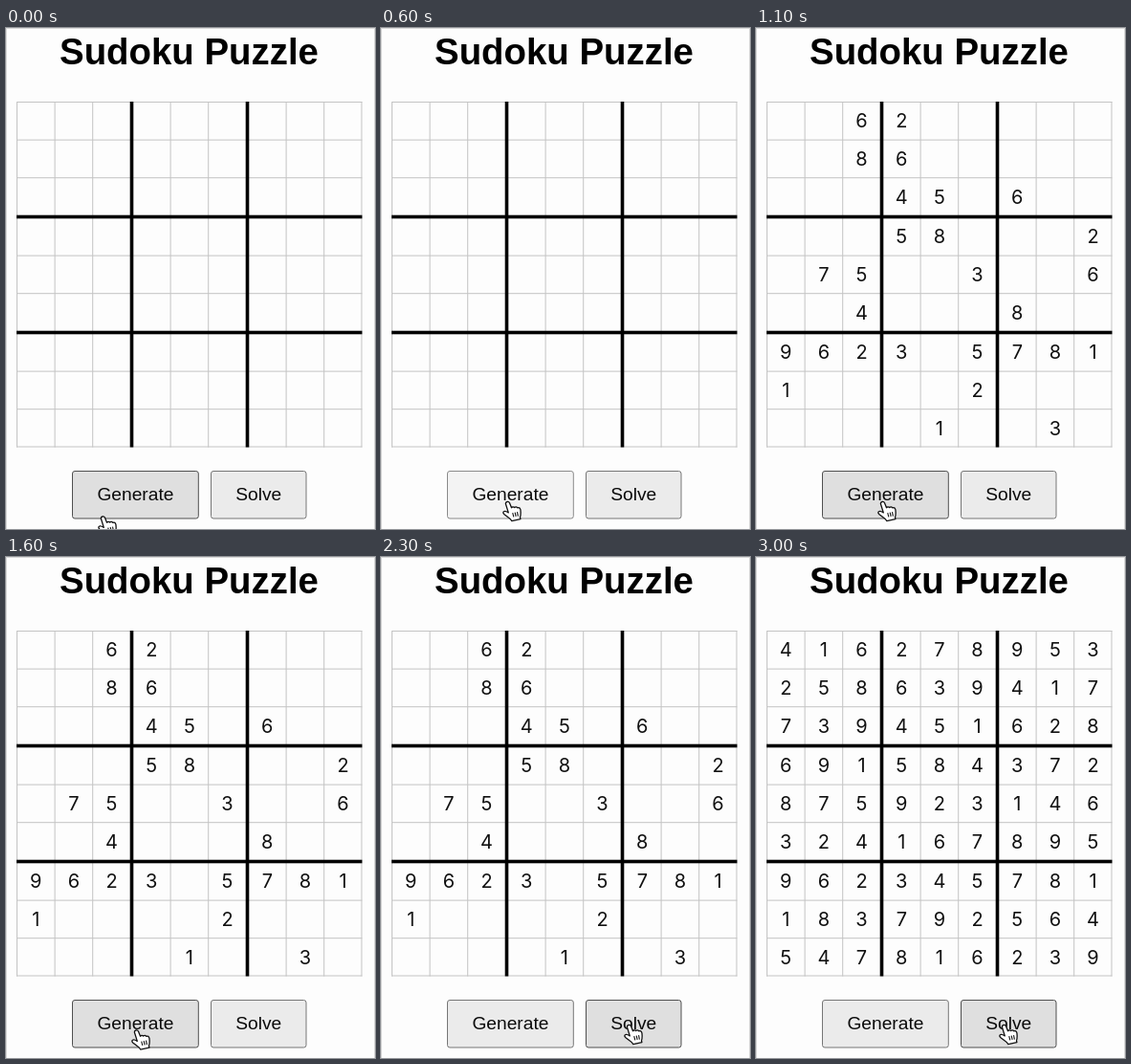
An HTML page with a canvas for the animation above (4000 ms loop, 386 by 524 pixels).

```html
<!DOCTYPE html>
<html lang="en">
<head>
<meta charset="utf-8">
<title>Sudoku Puzzle</title>
<style>
html, body { margin: 0; width: 100%; height: 100%; overflow: hidden; background: #fdfdfd; }
canvas { display: block; width: 386px; height: 524px; }
</style>
</head>
<body>
<canvas id="stage" width="386" height="524"></canvas>
<script>
const ctx = document.getElementById('stage').getContext('2d');
const LOOP = 4000;
const STEP = 100;
const SANS = '"Liberation Sans", Arial, sans-serif';

const solution = [
  '416278953', '258639417', '739451628',
  '691584372', '875923146', '324167895',
  '962345781', '183792564', '547816239'
];
// '#' marks the cells given at the start
const givens = [
  '..##.....', '..##.....', '...##.#..',
  '...##...#', '.##..#..#', '..#...#..',
  '####.####', '#....#...', '....#..#.'
];

const buttons = [
  { label: 'Generate', x: 69, w: 132.8, down: [600, 800] },
  { label: 'Solve', x: 214, w: 100.5, down: [2800, 2900] }
];
const BTN_Y = 463, BTN_H = 50.5;
const looks = {
  idle: ['#ebebeb', '#767676'],
  hover: ['#dfdfdf', '#4f4f4f'],
  down: ['#f3f3f3', '#8a8a8a']
};

// pointer stops: time, x, y
const route = [
  [0, 103, 511], [100, 113, 507], [200, 125, 500], [300, 134, 495.5],
  [1500, 134, 495.5], [1600, 138, 495], [1700, 155, 493], [1800, 182, 489],
  [1900, 209, 484.5], [2000, 233, 488], [2100, 249, 490],
  [2200, 257, 490], [2300, 261, 489.5], [LOOP, 261, 489.5]
];

const hand = new Path2D('M-2 1.6Q-1.8 0 0 0Q1.8 0 2.2 1.8L3.2 7Q5 5.6 6.3 7.4' +
  'Q8.3 6.4 9.3 8.4Q11.8 7.8 12 11L11.6 14Q11 17 10 18.5L10 20.6L.6 20.6' +
  'Q0 18.5-2 16.5L-5.8 12Q-7 10-5.5 9.3Q-3.8 8.8-1 11.4Z');
const creases = new Path2D('M3.3 12.5L3.5 17M5.8 12.5L5.9 17M8.2 12.5L8.2 17');
const arrow = new Path2D('M0 0L0 15.6L3.6 12.4L6 18L8.6 16.9L6.2 11.4L11 11.2Z');

function pointerAt(t) {
  const i = route.findIndex(p => p[0] > t);
  const [t0, x0, y0] = route[i - 1];
  const [t1, x1, y1] = route[i];
  const k = (t - t0) / (t1 - t0);
  return { x: x0 + (x1 - x0) * k, y: y0 + (y1 - y0) * k };
}

function text(str, x, y, font, color) {
  ctx.font = font;
  ctx.fillStyle = color;
  ctx.textAlign = 'center';
  ctx.textBaseline = 'alphabetic';
  ctx.fillText(str, x, y);
}

const LEFT = 11, TOP = 77, SIZE = 361.5;
const offset = i => Math.floor(i / 3) * 121 + (i % 3) * 39.6;

function gridLine(pos, width) {
  ctx.fillRect(LEFT + pos, TOP, width, SIZE);
  ctx.fillRect(LEFT, TOP + pos, SIZE, width);
}

function drawGrid() {
  ctx.fillStyle = '#c4c4c4';
  for (let i = 0; i <= 9; i++) {
    if (i !== 3 && i !== 6) gridLine(i < 9 ? offset(i) : SIZE - 1, 1);
  }
  ctx.fillStyle = '#000';
  for (const i of [3, 6]) gridLine(offset(i) - 2.3, 3.6);
}

function drawDigits(t) {
  if (t < 1000) return;
  solution.forEach((row, r) => {
    for (let c = 0; c < 9; c++) {
      if (t < 3000 && givens[r][c] !== '#') continue;
      text(row[c], LEFT + 20.3 + offset(c), TOP + 27.3 + offset(r),
        '400 20px Inter, sans-serif', '#111');
    }
  });
}

const isOver = (b, p) =>
  p.x >= b.x && p.x < b.x + b.w && p.y >= BTN_Y && p.y < BTN_Y + BTN_H;

function drawButton(b, t, p) {
  const pressed = t >= b.down[0] && t < b.down[1];
  const [fill, edge] = looks[pressed ? 'down' : isOver(b, p) ? 'hover' : 'idle'];
  ctx.beginPath();
  ctx.roundRect(b.x + 0.5, BTN_Y + 0.5, b.w - 1, BTN_H - 1, 2.5);
  ctx.fillStyle = fill;
  ctx.fill();
  ctx.lineWidth = 1;
  ctx.strokeStyle = edge;
  ctx.stroke();
  text(b.label, b.x + b.w / 2, 494.4, '19.2px ' + SANS, '#0a0a0a');
}

function drawPointer(p) {
  ctx.save();
  ctx.translate(p.x, p.y);
  ctx.lineJoin = 'round';
  if (buttons.some(b => isOver(b, p))) {
    ctx.translate(-2, 0);
    ctx.rotate(-0.2);
    ctx.fillStyle = '#fff';
    ctx.fill(hand);
    ctx.strokeStyle = '#111';
    ctx.lineWidth = 1.3;
    ctx.stroke(hand);
    ctx.lineWidth = 1.1;
    ctx.stroke(creases);
  } else {
    ctx.strokeStyle = '#fff';
    ctx.lineWidth = 2.4;
    ctx.stroke(arrow);
    ctx.fillStyle = '#000';
    ctx.fill(arrow);
  }
  ctx.restore();
}

function draw(now) {
  const t = Math.floor((now % LOOP) / STEP) * STEP;
  const p = pointerAt(t);
  ctx.fillStyle = '#fdfdfd';
  ctx.fillRect(0, 0, 386, 524);
  ctx.fillStyle = '#dcdcdc';
  ctx.fillRect(0, 0, 386, 1);
  ctx.fillRect(0, 0, 1, 524);
  ctx.fillRect(385, 0, 1, 524);
  text('Sudoku Puzzle', 191.5, 38, 'bold 38.4px ' + SANS, '#000');
  drawGrid();
  drawDigits(t);
  buttons.forEach(b => drawButton(b, t, p));
  drawPointer(p);
}

const start = performance.now();
function tick() {
  draw(performance.now() - start);
  requestAnimationFrame(tick);
}
tick();
</script>
</body>
</html>
```
